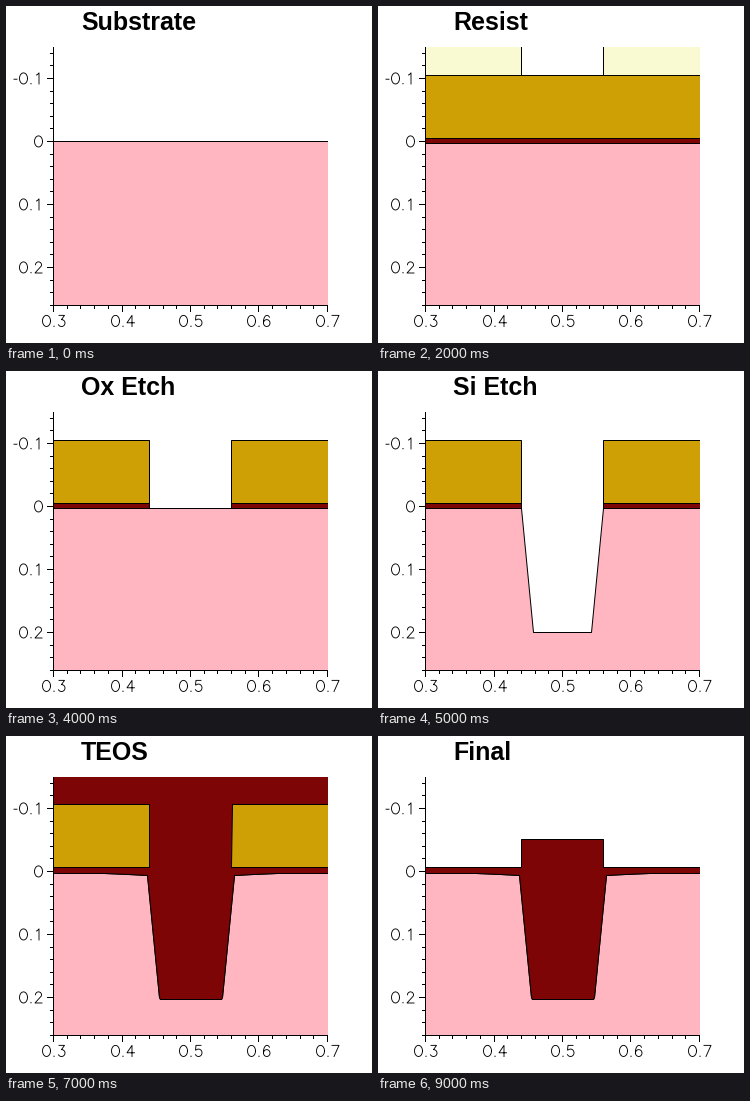
Recreate the animation shown at these times as a matplotlib script. Size 366 by 337 pixels, loop 10 s.

```python
import numpy as np
import matplotlib.pyplot as plt
from matplotlib.animation import FuncAnimation
from matplotlib.patches import Polygon, Rectangle

W, H, DPI = 366, 337, 64
PX = 72 / DPI                      # one pixel in points
LEFT, RIGHT, TOP, BOTTOM = 47, 321, 41, 299
OUT_L, OUT_R, OUT_T, OUT_B = 30, 340, 20, 320   # beyond the clip box

SILICON, OXIDE, NITRIDE, RESIST = "#ffb6c1", "#7d0506", "#cfa006", "#fafad2"
TITLES = ["Substrate", "Ni Depo", "Resist", "Ni Etch", "Ox Etch",
          "Si Etch", "Liner", "TEOS", "CMP", "Final"]

fig = plt.figure(figsize=(W / DPI, H / DPI), dpi=DPI, facecolor="white")
ax = fig.add_axes([0, 0, 1, 1])
ax.set_xlim(0, W)
ax.set_ylim(H, 0)
ax.axis("off")
clip = Rectangle((LEFT, TOP), RIGHT + 1 - LEFT, BOTTOM + 1 - TOP,
                 transform=ax.transData)
title = ax.text(75, 24, "", family="Liberation Sans", weight="bold",
                size=25 * PX, va="baseline")
layers = []


# ---- axes and stroke lettering ----
def stroke(pts, lw=1.0):
    x, y = np.array(pts, float).T + 0.5      # pixel centres
    ax.plot(x, y, color="black", lw=lw * PX, zorder=5, clip_on=False, snap=False)


def arc(cx, cy, rx, ry, a, b):
    t = np.radians(np.linspace(a, b, 24))
    return list(zip(cx + rx * np.cos(t), cy + ry * np.sin(t)))


# glyph: (advance, strokes), cap height 21 units
GLYPHS = {
    "0": (20, [arc(10, 10.5, 8, 10.5, 0, 360)]),
    "1": (20, [[(6, 17), (8, 18), (11, 21), (11, 0)]]),
    "2": (20, [arc(10, 15.5, 6, 5.5, 180, -30) + [(3, 0), (17, 0)]]),
    "3": (20, [[(5, 21), (16, 21), (10, 13)] + arc(10, 6.5, 7, 6.5, 80, -150)]),
    "4": (20, [[(13, 0), (13, 21), (3, 7), (18, 7)]]),
    "5": (20, [[(15, 21), (5, 21), (4, 12)] + arc(10, 7, 7, 7, 125, -150)]),
    "6": (20, [arc(11, 9, 7, 12, 45, 180) + arc(10.5, 6.5, 6.5, 6.5, 180, 540)]),
    "7": (20, [[(3, 21), (17, 21), (7, 0)]]),
    ".": (10, [[(4.5, 0.5), (5.5, 0.5)]]),
    "-": (10, [[(1, 9), (7, 9)]]),
}
UNIT_X, UNIT_Y = 0.5, 0.53


def width(text):
    return UNIT_X * sum(GLYPHS[c][0] for c in text)


def letter(text, x, base):
    for c in text:
        advance, strokes = GLYPHS[c]
        for pts in strokes:
            stroke([(x + UNIT_X * u, base - UNIT_Y * v) for u, v in pts], 0.9)
        x += UNIT_X * advance


def draw_axes():
    stroke([(LEFT, TOP), (LEFT, BOTTOM)])
    stroke([(LEFT, BOTTOM), (RIGHT, BOTTOM)])
    for k in range(21):
        x = round(LEFT + 13.7 * k)
        major = k % 5 == 0
        stroke([(x, BOTTOM), (x, BOTTOM + (6 if major else 3))])
        if major:
            text = f"{0.3 + 0.02 * k:.1f}"
            letter(text, x + 0.5 - width(text) / 2, 320)
    for k in range(-7, 14):
        y = round(135 + 12.6 * k)
        major = k % 5 == 0
        stroke([(LEFT - (6 if major else 3), y), (LEFT, y)])
        if major:
            text = f"{0.02 * k:.1f}" if k else "0"
            letter(text, 37 - width(text), y + 5.5)


# ---- material layers ----
def shape(pts, color):
    p = Polygon(np.array(pts, float) + 0.5, closed=True, fc=color, ec="black",
                lw=PX, joinstyle="miter", zorder=2, snap=False)
    ax.add_patch(p)
    p.set_clip_path(clip)
    layers.append(p)


def slab(y0, y1, color, x0=OUT_L, x1=OUT_R):
    shape([(x0, y0), (x1, y0), (x1, y1), (x0, y1)], color)


def pair(y0, y1, color):
    slab(y0, y1, color, x1=143)
    slab(y0, y1, color, x0=225)


def mirrored(half, total):
    return half + [(total - x, y) for x, y in reversed(half)]


def silicon(surface):
    shape(surface + [(OUT_R, OUT_B), (OUT_L, OUT_B)], SILICON)


def oxide(surface, top):
    shape(surface + top[::-1], OXIDE)


ETCHED = [(OUT_L, 137)] + mirrored([(143, 137), (155, 261)], 368) + [(OUT_R, 137)]
GROWN = ([(OUT_L, 137)]
         + mirrored([(98, 137), (122, 138), (141, 139), (153, 261), (154, 263)], 369)
         + [(OUT_R, 137)])
LINED = ([(OUT_L, 131)]
         + mirrored([(143, 131), (145, 136), (148, 140), (150, 152), (159, 258)], 369)
         + [(OUT_R, 131)])
PLUG = [(OUT_L, 131), (143, 131), (143, 103), (225, 103), (225, 131), (OUT_R, 131)]


def grown_nitride(top):
    slab(top, 131, NITRIDE, x1=143)
    lean = (131 - top) / 63
    shape([(225 + lean, top), (OUT_R, top), (OUT_R, 131), (225, 131)], NITRIDE)


def update(step):
    while layers:
        layers.pop().remove()
    title.set_text(TITLES[step])

    if step == 0:
        slab(135, OUT_B, SILICON)
    elif step <= 5:
        if step == 5:
            silicon(ETCHED)
        else:
            slab(137, OUT_B, SILICON)
        if step < 4:
            slab(132, 137, OXIDE)
        else:
            pair(132, 137, OXIDE)
        if step < 3:
            slab(69, 132, NITRIDE)
        else:
            pair(69, 132, NITRIDE)
        if step in (2, 3):
            pair(OUT_T, 69, RESIST)
    else:
        silicon(GROWN)
        if step == 6:
            oxide(GROWN, LINED)
            grown_nitride(68)
        elif step == 7:
            oxide(GROWN, [(OUT_L, OUT_T), (OUT_R, OUT_T)])
            grown_nitride(68)
        elif step == 8:
            oxide(GROWN, [(OUT_L, 103), (OUT_R, 103)])
            grown_nitride(103)
        else:
            oxide(GROWN, PLUG)
    return layers + [title]


draw_axes()
anim = FuncAnimation(fig, update, frames=len(TITLES), interval=1000,
                     repeat=True, repeat_delay=0, init_func=lambda: update(0))
plt.show()
```
